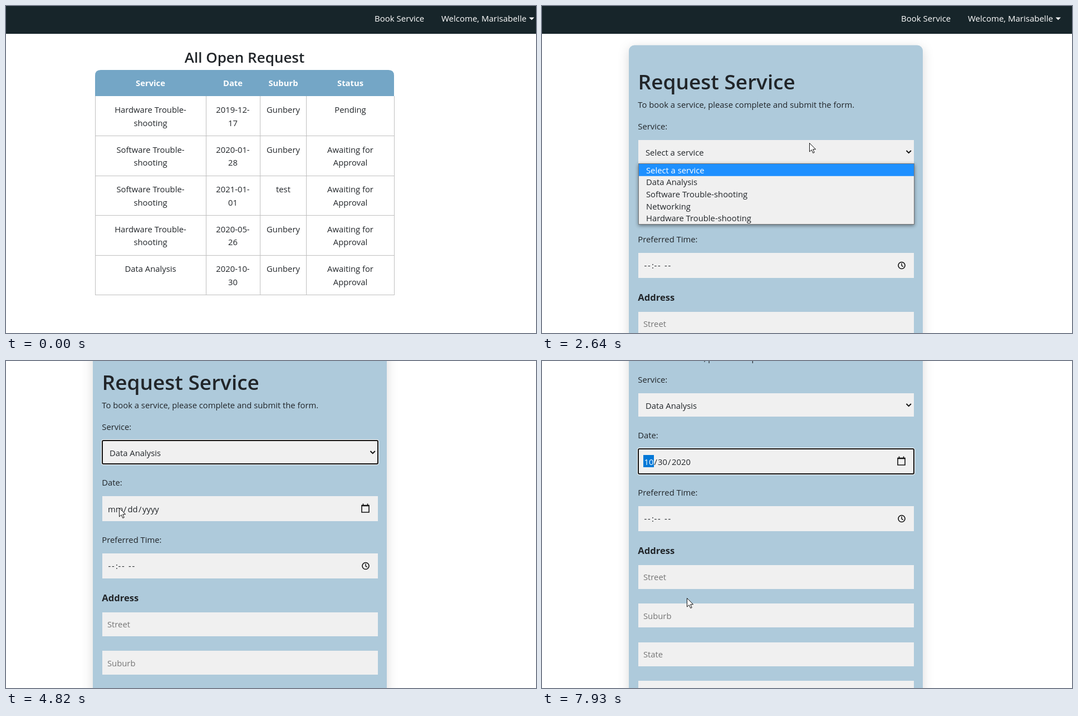
Recreate the animation shown at these times as an HTML page. Size 952 px wide and 588 px high, loop 8 s.

```html
<!DOCTYPE html>
<html lang="en">
<head>
<meta charset="utf-8">
<title>Request service</title>
<style>
  html, body { margin: 0; height: 100%; overflow: hidden; background: #fff; }
  svg { display: block; width: 100vw; height: 100vh; font: 14.8px "Open Sans", "Noto Sans", sans-serif; fill: #212529; }
  .mid { text-anchor: middle; }
  .bold { font-weight: 700; }
  .semi { font-weight: 600; }
  .nav, .on { fill: #fff; }
  .nav { font-size: 15px; }
  .hint { fill: #757575; }
  .line { fill: none; stroke: #111; stroke-width: 2; }
  .grid { fill: none; stroke: #c0c0c0; }
  .panel { fill: #aecadb; filter: drop-shadow(0 5px 10px rgba(0,0,0,.15)); }
  .popup { filter: drop-shadow(0 2px 3px rgba(0,0,0,.45)); }
  .dash { letter-spacing: 1.7px; }
  .cal { font: 12px "Liberation Sans", Arial, sans-serif; fill: #111; }
</style>
</head>
<body>
<svg id="stage" viewBox="0 0 952 588"></svg>
<script>
const text = (x, y, s, cls = '', more = '') => `<text x="${x}" y="${y}" class="${cls}" ${more}>${s}</text>`;
const rect = (x, y, w, h, fill, more = '') => `<rect x="${x}" y="${y}" width="${w}" height="${h}" fill="${fill}" ${more}/>`;
const path = (d, more = '') => `<path d="${d}" ${more}/>`;
const group = (id, body, more = '') => `<g id="${id}" ${more}>${body}</g>`;
const field = (y, h) => rect(173, y, 495, h, '#f0f0f0');
// Focus outline: black with a thin white halo.
const ring = (id, y, h) => group(id,
  rect(172, y - 1, 497, h + 2, 'none', 'rx="3" stroke="#fff" stroke-width="2"') +
  rect(173, y, 495, h, 'none', 'rx="2" stroke="#111" stroke-width="2"'));

const nav = x => rect(0, 0, 952, 50, '#17252a') +
  text(x, 28, 'Book Service', 'nav') +
  text(x + 120, 28, 'Welcome, Marisabelle', 'nav') +
  path(`M${x + 277.5} 20.5h9.4l-4.7 4.7z`, 'class="nav"');

function requestTable() {
  const centers = [259.5, 407.5, 498, 618.5], wait = ['Awaiting for', 'Approval'];
  const hard = ['Hardware Trouble-', 'shooting'], soft = ['Software Trouble-', 'shooting'], town = ['Gunbery'];
  const rows = [
    [hard, ['2019-12-', '17'], town, ['Pending']],
    [soft, ['2020-01-', '28'], town, wait],
    [soft, ['2021-01-', '01'], ['test'], wait],
    [hard, ['2020-05-', '26'], town, wait],
    [['Data Analysis'], ['2020-10-', '30'], town, wait]
  ];
  const pitch = 71.5;
  let out = text(428.5, 102, 'All Open Request', 'mid semi', 'font-size="26"') +
    path('M160 162V125q0-10 10-10H687q10 0 10 10V162z', 'fill="#74a6c6"');
  ['Service', 'Date', 'Suburb', 'Status'].forEach((s, i) => out += text(centers[i], 144, s, 'mid bold on'));
  rows.forEach((row, r) => {
    const y = 162 + r * pitch;
    out += path(`M160 ${Math.floor(y + pitch) + .5}H698`, 'class="grid"');
    row.forEach((cell, c) => cell.forEach((s, k) => out += text(centers[c], y + 30 + k * 23.7, s, 'mid')));
  });
  return out + path('M160.5 162V520M359.5 162V520M456.5 162V520M539.5 162V520M697.5 162V520', 'class="grid"');
}

function options() {
  const names = ['Select a service', 'Data Analysis', 'Software Trouble-shooting', 'Networking', 'Hardware Trouble-shooting'];
  return rect(173.5, 283.5, 495, 109, '#f0f0f0', 'stroke="#777" class="popup"') +
    rect(174, 284, 494, 21.8, '#1e90ff', 'id="pick"') +
    names.map((s, i) => text(187, 300.7 + i * 21.6, s, 'option')).join('');
}

function calendar() {
  const x = i => 197 + i * 27.45;
  let out = rect(173.5, 289.5, 212, 273, '#fff', 'stroke="#b5b5b5" class="popup"') +
    text(183, 315, 'October 2020', 'bold') + path('M262 308.5h7l-3.5 4.5z') +
    path('M330.5 319.5V304.5M323.5 311.5l7-7 7 7M362 304V319M355 312l7 7 7-7', 'fill="none" stroke="#333" stroke-width="1.3"') +
    rect(184, 444, 26, 26, '#0075ff', 'stroke="#111" stroke-width="2"');
  ['Su', 'Mo', 'Tu', 'We', 'Th', 'Fr', 'Sa'].forEach((s, i) => out += text(x(i), 351, s, 'mid'));
  for (let i = 0; i < 42; i++) {
    const day = i < 4 ? 27 + i : (i - 4) % 31 + 1;
    const cls = day === 18 ? 'bold on' : i < 4 || i > 34 ? 'hint' : '';
    out += text(x(i % 7), 379 + Math.floor(i / 7) * 27.45, day, 'mid ' + cls);
  }
  return out + text(334, 547, 'Today', '', 'fill="#0b7bbf"');
}

// Each date part sits in its own slot; the first one can be selected.
const dateParts = (xs, parts, w) =>
  rect(182, 352, w, 22, '#0078d7', 'class="mark"') +
  parts.map((s, i) => text(xs[i], 369.5, s, i ? '' : 'first')).join('');

const form = () => rect(156, 70.5, 528, 900, '', 'rx="10" class="panel"') +
  text(172.5, 150, 'Request Service', 'semi', 'font-size="37"') +
  text(172.3, 183, 'To book a service, please complete and submit the form.') +
  text(172.3, 222, 'Service:') + field(241, 42) + text(186, 268.5, '', '', 'id="service"') +
  path('M654.5 260l4.2 4.2 4.2-4.2', 'class="line"') + ring('ringService', 241, 42) +
  text(172.3, 322, 'Date:') + field(341, 45) +
  group('blank', dateParts([183, 211, 218.5, 238, 245], ['mm', '/', 'dd', '/', 'yyyy'], 28)) +
  group('chosen', dateParts([183.5, 201.5, 208, 226, 233], ['10', '/', '30', '/', '2020'], 19)) +
  path('M639 357.5H652V370H639zM639 358.5H652M641.5 354.5v3M649.5 354.5v3', 'class="line" style="stroke-width:1.6"') +
  ring('ringDate', 341, 45) +
  text(172.3, 425, 'Preferred Time:') + field(444, 45) +
  text(183.5, 472, '--', 'dash') + text(197, 472, ':') + text(201.5, 472, '--', 'dash') + text(220, 472, '--', 'dash') +
  '<circle cx="646" cy="466.5" r="6" class="line" style="stroke-width:1.6"/>' +
  path('M646 462.5v4.3l2.8 1.8', 'class="line" style="stroke-width:1.4"') +
  text(172.3, 530, 'Address', 'bold', 'font-size="16.6"') +
  ['Street', 'Suburb', 'State', 'Postcode'].map((s, i) =>
    field(Math.floor(550 + i * 69.5), 43) + text(182, 577 + i * 69.5, s, 'hint')).join('');

const arrow = path('M.5.5V16L4.2 12.6 6.8 18.4 9.2 17.4 6.7 11.7H11.6z', 'id="arrow" fill="#fff" stroke="#111"');
const hand = group('hand',
  path('M5 2.2c0-2.2 3-2.2 3 0v6c1-1 2.8-.8 3 .6 1-.9 2.6-.6 2.8.7 1.2-.6 2.2 0 2.2 1.4v3.6c0 2.5-1.2 3.5-1.5 6.5h-8c-.5-2-3-4.5-5.5-8-1-2 1-3 2.5-1.6l1.5 1.6z') +
  path('M8 8v3M11 9v2.5M13.8 10v2', 'fill="none"'),
  'transform="translate(-5.5 -1)" fill="#fff" stroke="#17252a" stroke-width=".8"');

document.getElementById('stage').innerHTML =
  group('list', nav(662) + requestTable()) +
  group('booking', nav(645) + form() + group('options', options()) +
    group('calendar', calendar(), 'class="cal" transform="translate(0 98)"')) +
  group('cursor', arrow + hand);

const $ = id => document.getElementById(id);
const show = (id, on) => $(id).style.display = on ? '' : 'none';

// Keys: time, then values.
const pointer = [
  [150, 938, 560], [306, 900, 420], [461, 820, 250], [617, 720, 110], [773, 645, 38], [850, 634, 10],
  [928, 653, 9], [1006, 658.5, 9], [1317, 671.5, 21], [1861, 671.5, 21], [2328, 480, 246],
  [2790, 480, 246], [3106, 420, 324], [3340, 420, 324], [3962, 262, 372], [4195, 254, 368], [4273, 253, 367],
  [4507, 240, 345], [4818, 203, 264], [5285, 203, 264], [5752, 651, 267], [5907, 646, 268], [6140, 633, 270],
  [6607, 319, 484], [6685, 319, 484], [6763, 319, 488], [6918, 319, 488], [7074, 330, 484],
  [7380, 330, 484], [7619, 260, 426]
];
const scroll = [[4195, 0], [4273, 12.7], [4351, 50], [4429, 85], [4507, 98],
  [7696, 98], [7774, 110.7], [7852, 148], [7930, 183]];

function at(keys, t) {
  const i = keys.findIndex(k => k[0] > t);
  if (i < 0) return keys[keys.length - 1].slice(1);
  if (!i) return keys[0].slice(1);
  const a = keys[i - 1], b = keys[i], p = (t - a[0]) / (b[0] - a[0]);
  return a.slice(1).map((v, k) => v + (b[k + 1] - v) * p);
}

function draw(t) {
  const step = 77.8, tick = 150 + step * Math.floor((t - 130) / step);
  const [x, y] = at(pointer, tick), [top] = at(scroll, tick);
  const within = (a, b) => t >= a && t < b;

  show('list', t < 1560);
  show('booking', t >= 1560);
  $('booking').setAttribute('transform', `translate(0 ${-top})`);

  show('options', within(2560, 3350));
  $('options').style.opacity = t < 2640 ? .6 : 1;
  const picked = y >= 306 ? 1 : 0;
  $('pick').setAttribute('y', 284 + picked * 21.6);
  document.querySelectorAll('.option').forEach((o, i) => o.classList.toggle('on', i === picked));

  $('service').textContent = t < 3350 ? 'Select a service' : 'Data Analysis';
  show('ringService', within(3350, 4970));
  show('ringDate', t >= 4970);
  show('blank', t < 7220);
  show('chosen', t >= 7220);
  show('calendar', within(5890, 7220));
  document.querySelectorAll('.mark').forEach(m => m.style.opacity = t >= 4970 ? 1 : 0);
  document.querySelectorAll('.first').forEach(f => f.classList.toggle('on', t >= 4970));

  const pointing = y < 36 && x > 650;
  show('cursor', t >= 150);
  show('arrow', !pointing);
  show('hand', pointing);
  $('cursor').setAttribute('transform', `translate(${x} ${y})`);
}

function loop() {
  draw(performance.now() % 8000);
  requestAnimationFrame(loop);
}
loop();
</script>
</body>
</html>
```
